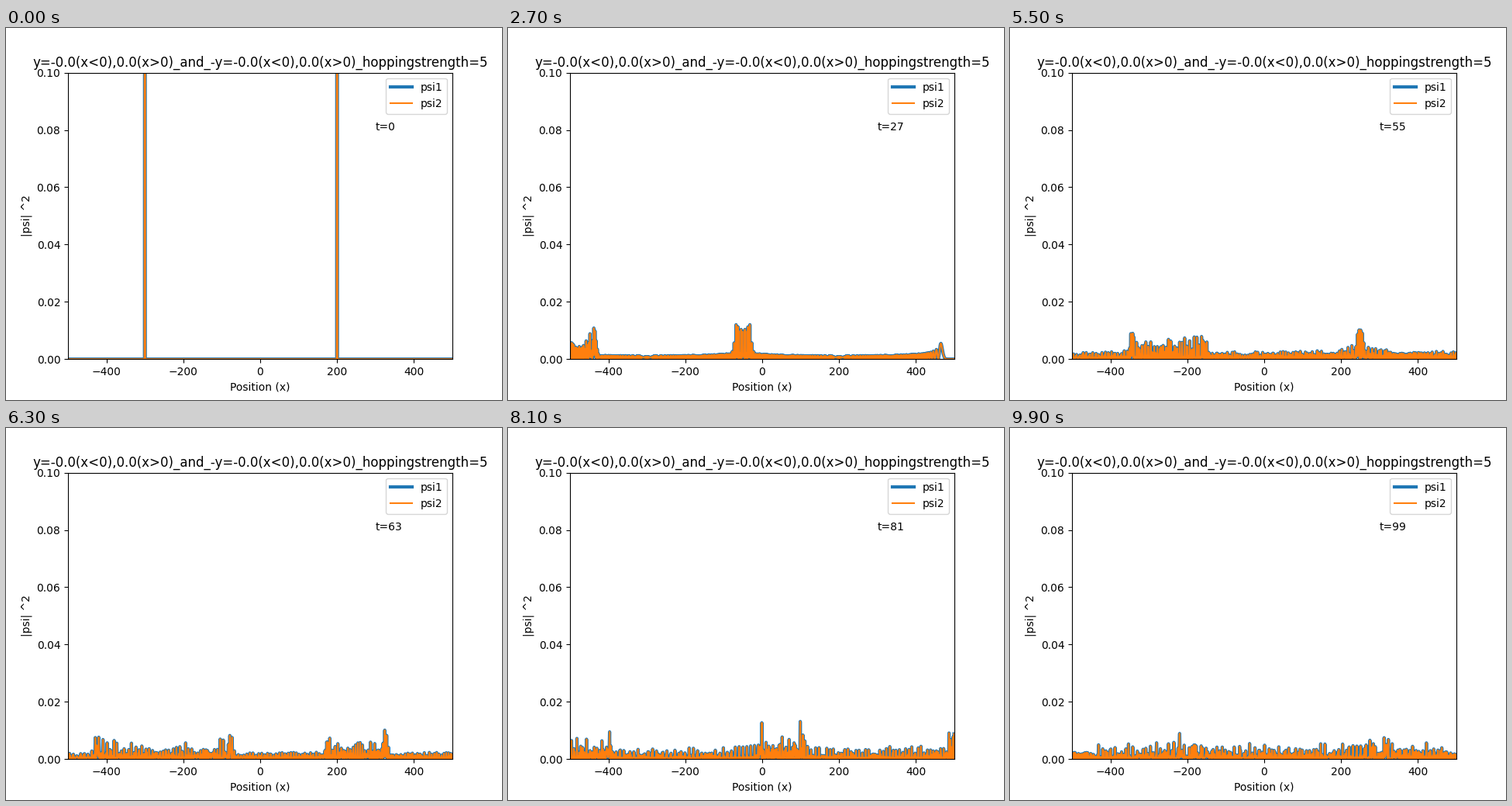
These frames come from a looping animation (640 by 480 pixels, 10 s). A matplotlib script:

```python
import numpy as np
import matplotlib.pyplot as plt
from matplotlib.animation import FuncAnimation

HOP = 5
FRAMES = 100
x = np.arange(-500, 500)
size = len(x)

# Open tight-binding chain, solved with its standing-wave modes
j = np.arange(1, size + 1)
k = np.pi * j / (size + 1)
modes = np.sqrt(2 / (size + 1)) * np.sin(np.outer(j, k))
energy = 2 * HOP * np.cos(k)

start = np.zeros(size)
start[np.isin(x, (-300, 200))] = np.sqrt(0.5)
weights = modes @ start


def density(t):
    phase = energy * t
    re = modes @ (weights * np.cos(phase))
    im = modes @ (weights * np.sin(phase))
    return re**2 + im**2


plt.rcParams["font.family"] = "DejaVu Sans"
fig, ax = plt.subplots(figsize=(6.4, 4.8), dpi=100)
wide, = ax.plot(x, density(0), lw=3, color="#1f77b4", label="psi1")
thin, = ax.plot(x, density(0), lw=1.5, color="#ff7f0e", label="psi2")
clock = ax.text(300, 0.08, "t=0")

ax.set_xlim(-500, 500)
ax.set_ylim(0, 0.1)
ax.set_xlabel("Position (x)")
ax.set_ylabel("|psi| ^2")
slope = "y=-0.0(x<0),0.0(x>0)"
ax.set_title(f"{slope}_and_-{slope}_hoppingstrength={HOP}")
ax.legend(loc="upper right")


def update(t):
    prob = density(t)
    wide.set_ydata(prob)
    thin.set_ydata(prob)
    clock.set_text(f"t={t}")
    return wide, thin, clock


anim = FuncAnimation(fig, update, frames=FRAMES, interval=100,
                     repeat=True, repeat_delay=0)
plt.show()
```
